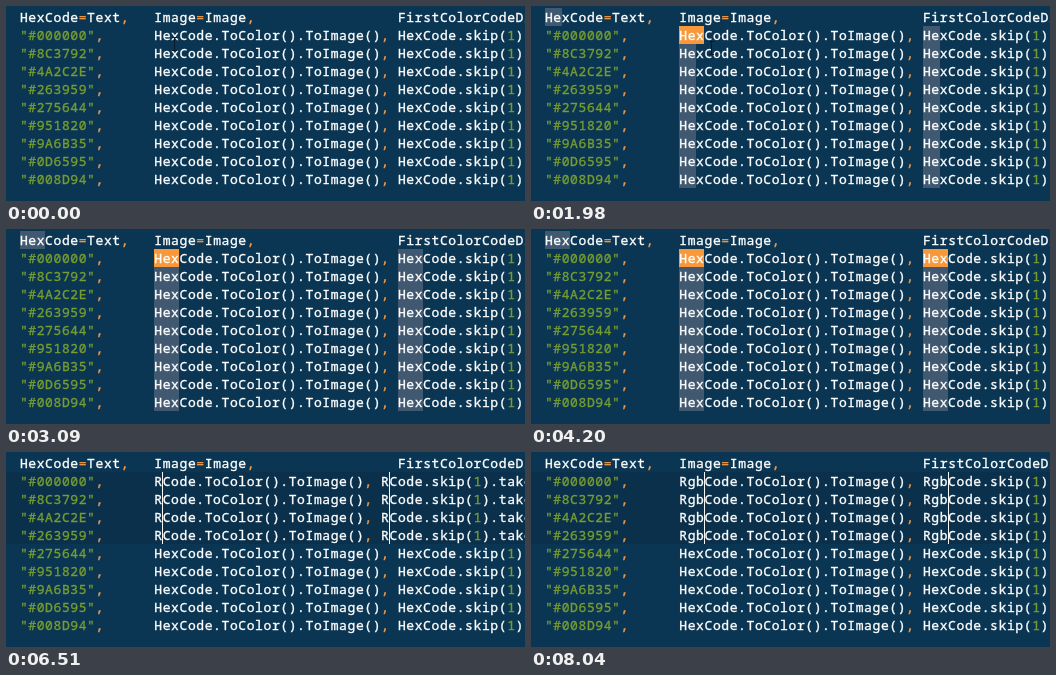
An HTML page for the animation above (8.07 s loop, 519 by 195 pixels).

```html
<!DOCTYPE html>
<html lang="en">
<head>
<meta charset="utf-8">
<title>Multiple selections</title>
<style>
html, body { margin: 0; width: 100%; height: 100%; overflow: hidden; background: #0b3653; }
#stage { position: relative; width: 519px; height: 195px; overflow: hidden; background: #0b3653; }
#stage div { position: absolute; }
.row {
  left: 13.9px; height: 18px; white-space: pre; color: #fff;
  font: 13px/18px "Noto Sans Mono", "DejaVu Sans Mono", monospace;
  letter-spacing: .6px; font-variant-ligatures: none;
  -webkit-text-stroke: .35px currentColor;
}
.str, .num { color: #769c32; }
.op { color: #f79a45; }
.band { background: #0a304b; }
.match { background: #405970; }
.sel { background: #f7993a; }
.caret { background: #f4f6f8; }
#mouse { left: 0; top: 0; width: 7px; height: 14px; }
#mouse svg { display: block; }
</style>
</head>
<body>
<div id="stage">
  <div id="boxes"></div>
  <div id="text"></div>
  <div id="carets"></div>
  <div id="mouse"><svg width="7" height="14"><path d="M1 .5h5M3.5 1v12M1 13.5h5" fill="none" stroke="#071a28"/></svg></div>
</div>
<script>
const LOOP = 8070, CHAR = 8.4, LINE = 18, LEFT = 13.6, TOP = 2;
const COLS = [16, 45];
const CODES = ["000000", "8C3792", "4A2C2E", "263959", "275644", "951820", "9A6B35", "0D6595", "008D94"];

// Times at which each state begins
const DRAG = [1650, 1770, 1890];
const ADD = [3900, 4380, 4620, 4860, 5130, 5400, 5730];
const TYPE = [6390, 6720, 6960];
const CLICK = 1500, LAG = 120;
const MOUSE = [[0, 168, 38], [700, 160, 36], [1450, 148, 33], [1650, 149, 33], [1980, 180, 42], [2500, 190, 47]];

const $ = id => document.getElementById(id);
const passed = (times, t) => times.filter(v => t >= v).length;
const span = (cls, s) => `<span class="${cls}">${s}</span>`;
const op = s => span("op", s);
const box = (cls, x, y, w, h = LINE) =>
  `<div class="${cls}" style="left:${x}px;top:${y}px;width:${w}px;height:${h}px"></div>`;
const colX = c => Math.round(LEFT + c * CHAR);
const rowY = r => TOP + r * LINE;
const line = (r, html) => `<div class="row" style="top:${rowY(r)}px">${html}</div>`;

function header() {
  return `HexCode${op("=")}Text${op(",")}   Image${op("=")}Image${op(",")}` +
    " ".repeat(17) + "FirstColorCodeDigits";
}

function codeLine(code, word) {
  return span("str", `"#${code}"`) + op(",") + " ".repeat(6) +
    `${word}Code.ToColor().ToImage()${op(",")} ` +
    `${word}Code.skip(${span("num", 1)}).take(${span("num", 2)})`;
}

function draw(s) {
  const word = "Rgb".slice(0, s.typed), selecting = s.drag && !s.typed;
  let text = line(0, header()), boxes = "", carets = "";

  CODES.forEach((code, i) => {
    const edited = s.typed && i < 4, y = rowY(i + 1);
    text += line(i + 1, codeLine(code, edited ? word : "Hex"));
    if (edited || (s.clicked && !s.drag && i === 0)) boxes += box("band", 0, y, 519);
    COLS.forEach((c, k) => {
      if (edited) {
        carets += box("caret", colX(c + s.typed - k * (3 - s.typed)), y, 1);
      } else if (selecting) {
        const chosen = i * 2 + k < s.count;
        boxes += box(chosen ? "sel" : "match", colX(c), y, (chosen ? s.drag : s.match) * CHAR);
      }
    });
  });
  if (selecting) boxes += box("match", colX(0), TOP, s.match * CHAR);
  if (s.clicked && !s.drag) carets += box("caret", colX(COLS[0]), rowY(1), 1);

  $("boxes").innerHTML = boxes;
  $("text").innerHTML = text;
  $("carets").innerHTML = carets;
}

function moveMouse(t) {
  const m = $("mouse"), next = MOUSE.findIndex(p => p[0] > t);
  m.style.display = next < 0 ? "none" : "block";
  if (next < 1) return;
  const a = MOUSE[next - 1], b = MOUSE[next];
  const u = (t - a[0]) / (b[0] - a[0]), e = u * u * (3 - 2 * u);
  const at = k => Math.round(a[k] + (b[k] - a[k]) * e);
  m.style.transform = `translate(${at(1) - 3}px, ${at(2) - 7}px)`;
}

let shown = "";
function tick() {
  const t = performance.now() % LOOP;
  const state = {
    clicked: t >= CLICK,
    drag: passed(DRAG, t),
    match: passed(DRAG, t - LAG),
    count: 1 + passed(ADD, t),
    typed: passed(TYPE, t)
  };
  const key = JSON.stringify(state);
  if (key !== shown) draw(state);
  shown = key;
  moveMouse(t);
  requestAnimationFrame(tick);
}
tick();
</script>
</body>
</html>
```
